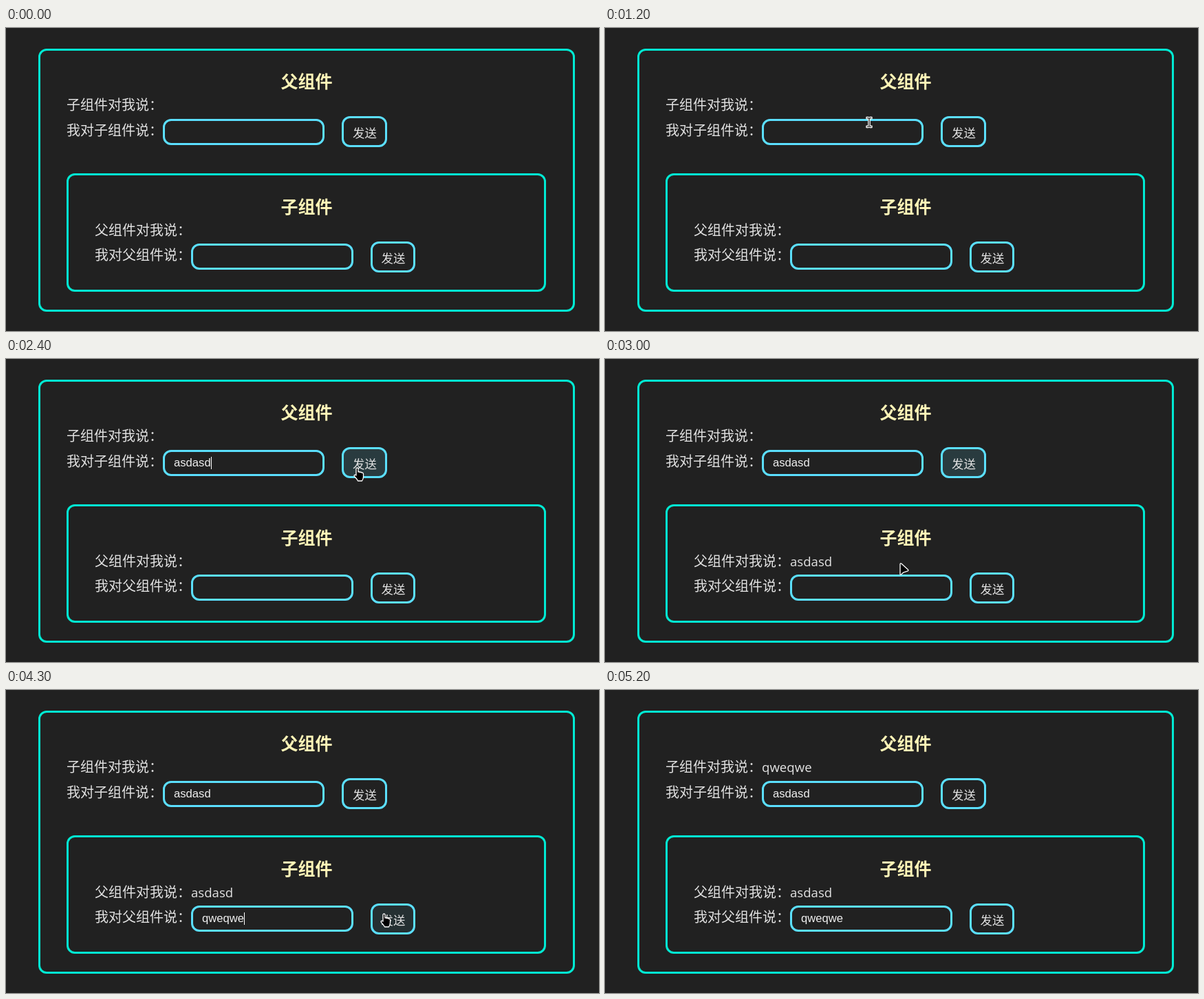
These frames come from a looping animation (862x440 px, 5.8 s). An HTML page:

```html
<!DOCTYPE html>
<html lang="zh-CN">
<head>
<meta charset="utf-8">
<style>
html, body { margin: 0; width: 100%; height: 100%; overflow: hidden; background: #212121; }
svg { display: block; }
text { fill: #e2e2e2; font: 20px "Noto Sans CJK SC", "Noto Sans CJK", sans-serif; }
.title { fill: #fff5b7; font-size: 25px; font-weight: bold; text-anchor: middle; }
.send { font-size: 17.4px; text-anchor: middle; }
.msg { font: 18.6px "Open Sans", "Noto Sans", sans-serif; }
.typed { fill: #eee; font: 16.67px "Liberation Sans", Arial, sans-serif; }
.box { fill: none; stroke-width: 3; }
.panel { stroke: #00ead3; }
.field { stroke: #5bdfff; }
.btn { fill: #5bdfff; fill-opacity: 0; stroke: #5bdfff; }
.caret { fill: #fff; }
.pointer { fill: #000; stroke: #fff; stroke-width: 1.3; stroke-linejoin: round; }
</style>
</head>
<body>
<svg id="stage" width="862" height="440" viewBox="0 0 862 440"></svg>
<script>
const LOOP = 5800, STEP = 100, FADE = 300, HOVER_ALPHA = 0.2;
const stage = document.getElementById('stage');

// Bordered box given by its outer edges
const box = (cls, l, t, r, b) =>
  `<rect class="box ${cls}" x="${l + 1.5}" y="${t + 1.5}" width="${r - l - 3}" height="${b - t - 3}" rx="10.5"/>`;
const label = (cls, x, y, s = '') => `<text class="${cls}" x="${x}" y="${y}">${s}</text>`;

const shapes = {
  arrow: 'M1 2.2V16.3Q1 18 2.4 16.9L6 13.8L12 11.8Q13.6 11 12.3 9.8L3 1.2Q1 .2 1 2.2Z',
  beam: 'M-4 -7.5H-1L0 -7L1 -7.5H4V-5.2H1.2V5.2H4V7.5H1L0 7L-1 7.5H-4V5.2H-1.2V-5.2H-4Z',
  hand: 'M4 12V2.5Q4 1 5.5 1T7 2.5V7Q8.5 6.3 9.5 7.5Q11 6.8 12 8Q14.5 7.8 14.5 10V14Q14.5 17 12.5 20H6.5Q5 17 1.5 13.5Q.5 12 2 11.2Z'
};

// Pointer path: time, x, y, shape; a place holds until the next entry
const path = [
  [400, 767, 424, 'arrow'], [500, 743, 401, 'arrow'], [600, 700, 368, 'arrow'],
  [700, 643, 326, 'arrow'], [800, 570, 273, 'arrow'], [900, 437, 178, 'arrow'],
  [1000, 381, 140, 'beam'], [1200, 384, 137, 'beam'], [1300, 386, 134, 'beam'],
  [1400, 388, 136, 'beam'], [1500, 389, 138, 'beam'], [1600, 388.5, 140, 'beam'],
  [2200, 418, 142, 'beam'], [2300, 505, 157, 'hand'], [2900, 463, 244, 'arrow'],
  [3000, 428, 296, 'arrow'], [3100, 405, 353, 'arrow'], [3200, 409, 352, 'arrow'],
  [3300, 410, 347, 'beam'], [3500, 413.5, 350, 'beam'], [3600, 393, 336, 'beam'],
  [4200, 440, 334, 'beam'], [4300, 544, 324, 'hand'], [4800, 562, 328, 'hand'],
  [4900, 695, 350, 'arrow'], [5000, 741, 382, 'arrow'], [5100, 774, 394, 'arrow'],
  [5200, 0, 0, '']
];

// keys: time at which each letter is in place
const forms = [
  { title: '父组件', hear: '子组件对我说：', say: '我对子组件说：', x: 88, y: 119, sayY: 156,
    field: [228, 132, 463, 170], btn: [488, 128, 554, 173],
    word: 'asdasd', keys: [1800, 1900, 2000, 2100, 2100, 2200],
    focus: 1300, blur: 2500, hover: [2200, 2900], heard: 'qweqwe', heardAt: 4600 },
  { title: '子组件', hear: '父组件对我说：', say: '我对父组件说：', x: 129, y: 301, sayY: 337,
    field: [269, 313, 505, 351], btn: [530, 310, 595, 355],
    word: 'qweqwe', keys: [3800, 3900, 4000, 4100, 4200, 4200],
    focus: 3400, blur: 4500, hover: [4180, 4900], heard: 'asdasd', heardAt: 2700 }
];

const drawForm = f => {
  const [fx, fy] = f.field, [l, t, r] = f.btn;
  return label('title', 437, f.y - 32, f.title) +
    label('', f.x, f.y, f.hear) + label('msg', f.x + 140, f.y) +
    label('', f.x, f.sayY, f.say) + box('field', ...f.field) +
    label('typed', fx + 16, fy + 24) +
    `<rect class="caret" y="${fy + 10}" width="1" height="18"/>` +
    box('btn', ...f.btn) + label('send', (l + r) / 2 + 0.5, t + 30.5, '发送');
};

stage.innerHTML = box('panel', 47, 30, 827, 412) + box('panel', 88, 211, 785, 383) +
  forms.map(f => `<g>${drawForm(f)}</g>`).join('') + '<path class="pointer"/>';

const pointer = stage.querySelector('.pointer');
stage.querySelectorAll('g').forEach((g, i) => {
  for (const part of ['msg', 'typed', 'caret', 'btn']) forms[i][part + 'El'] = g.querySelector('.' + part);
});

const ramp = (t, start) => Math.min(1, Math.max(0, (t - start) / FADE));

function render(t) {
  for (const f of forms) {
    f.msgEl.textContent = t >= f.heardAt ? f.heard : '';
    f.typedEl.textContent = f.word.slice(0, f.keys.filter(k => k <= t).length);
    const end = f.field[0] + 16 + f.typedEl.getComputedTextLength();
    f.caretEl.setAttribute('x', Math.round(end));
    f.caretEl.style.opacity = t >= f.focus && t < f.blur ? 1 : 0;
    f.btnEl.style.fillOpacity = HOVER_ALPHA * (ramp(t, f.hover[0]) - ramp(t, f.hover[1]));
  }
  const [, x, y, shape] = path.filter(p => p[0] <= t).pop() || [0, 0, 0, ''];
  pointer.setAttribute('d', shapes[shape] || '');
  pointer.setAttribute('transform', `translate(${x} ${y})`);
}

let origin;
function tick(now) {
  origin ??= now;
  render(Math.floor((now - origin) % LOOP / STEP) * STEP);
  requestAnimationFrame(tick);
}
render(0);
requestAnimationFrame(tick);
</script>
</body>
</html>
```
